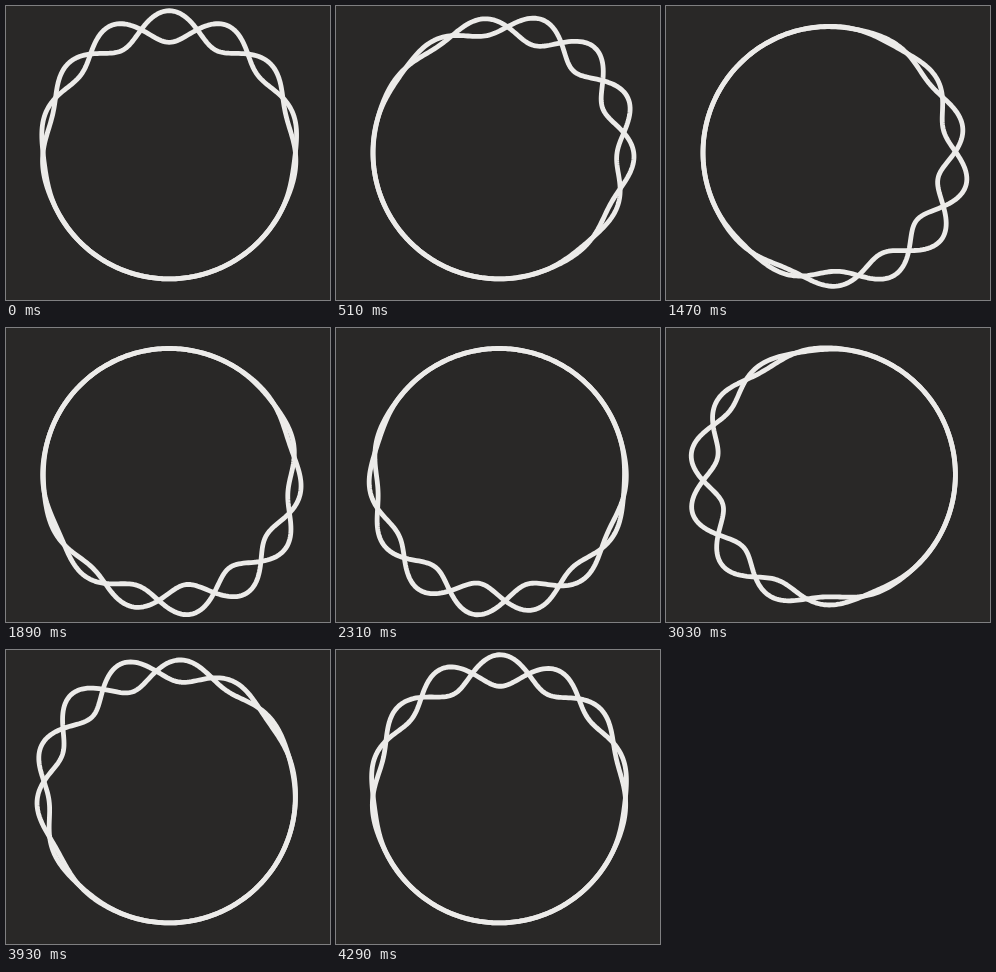
An HTML page for the animation above (4320 ms loop, 324 by 294 pixels).

```html
<!DOCTYPE html>
<html lang="en">
<head>
<meta charset="utf-8">
<title>Braided ring</title>
<style>
  html, body { margin: 0; width: 100%; height: 100%; overflow: hidden; background: #292827; }
  svg { display: block; width: 324px; height: 294px; }
  path { fill: none; stroke: #ecebe9; stroke-width: 4.8; stroke-linejoin: round; }
</style>
</head>
<body>
<svg viewBox="0 0 324 294">
  <path id="a"/>
  <path id="b"/>
</svg>
<script>
  const LOOP = 4320, STEP = 30;
  const CX = 163.2, CY = 146.7, RADIUS = 126.2;
  const SWING = 15.8, WAVES = 7, POINTS = 360;
  const TAU = Math.PI * 2;
  const strands = [[document.getElementById('a'), 1], [document.getElementById('b'), -1]];

  // Angles run clockwise from the top; the swell travels forward while the wave drifts back.
  function strand(u, side) {
    let d = '';
    for (let i = 0; i < POINTS; i++) {
      const angle = i / POINTS * TAU;
      const swell = ((1 + Math.cos(angle - u * TAU)) / 2) ** 3;
      const wave = Math.cos(WAVES * angle + 3 * Math.PI * u);
      const r = RADIUS + side * SWING * swell * wave;
      const x = CX + r * Math.sin(angle);
      const y = CY - r * Math.cos(angle);
      d += (i ? 'L' : 'M') + x.toFixed(2) + ' ' + y.toFixed(2);
    }
    return d + 'Z';
  }

  function draw(now) {
    const t = Math.floor((now % LOOP) / STEP) * STEP;
    for (const [path, side] of strands) path.setAttribute('d', strand(t / LOOP, side));
  }

  const start = performance.now();
  function tick() {
    draw(performance.now() - start);
    requestAnimationFrame(tick);
  }
  tick();
</script>
</body>
</html>
```
